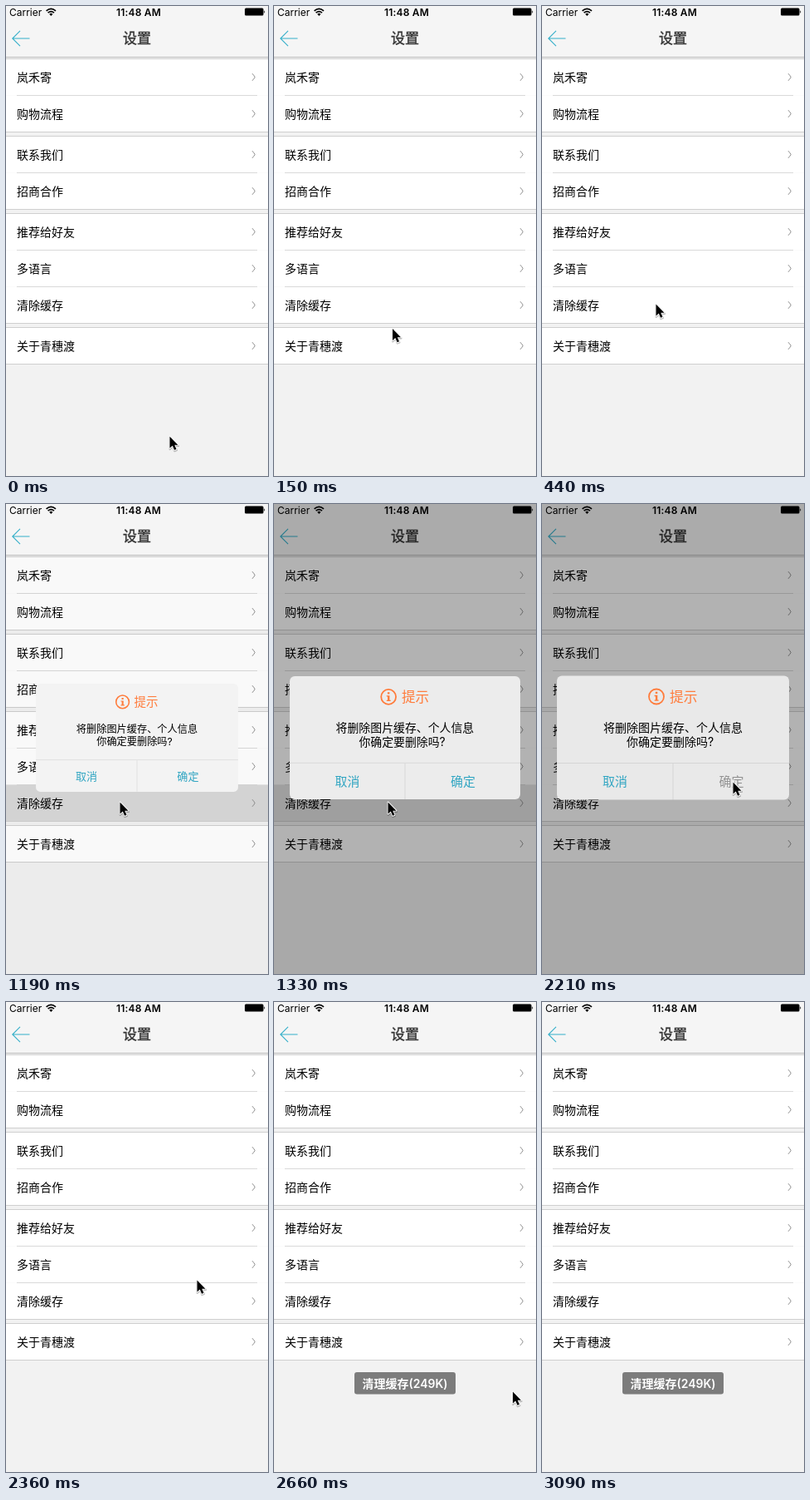
Write an HTML page that moves like this. It is 316 px wide and 565 px high and loops after 3.49 s.

```html
<!DOCTYPE html>
<html lang="zh-CN">
<head>
<meta charset="utf-8">
<title>设置</title>
<style>
  html, body { margin: 0; width: 100%; height: 100%; overflow: hidden; background: #f2f2f2; }
  svg { display: block; width: 316px; height: 565px; }
  text { font-family: Inter, "Noto Sans CJK SC", "Noto Sans CJK", sans-serif; font-size: 14px; }
  .mid { text-anchor: middle; }
  .line { fill: none; stroke: #d9d9d9; }
  .accent { fill: #30a5c2; }
  .warn { fill: #ff7c3c; }
</style>
</head>
<body>
<svg viewBox="0 0 316 565">
  <rect width="316" height="565" fill="#f2f2f2"/>
  <g id="header">
    <rect width="316" height="61" fill="#f5f5f5"/>
    <path d="M0 61.5H316" stroke="#bdbdbd"/>
    <text x="4" y="11.5" style="font-size:12px">Carrier</text>
    <g fill="none" stroke="#000" stroke-width="1.7">
      <path d="M48.6 5.8Q54.3 .8 60 5.8M50.6 8.2Q54.3 5 58 8.2"/>
      <path d="M52.2 9.7Q54.3 8 56.4 9.7L54.3 12Z" fill="#000" stroke="none"/>
    </g>
    <text class="mid" x="160" y="11.5" style="font-size:12px;font-weight:600;letter-spacing:.2px">11:48 AM</text>
    <rect x="288" y="2.5" width="22.5" height="9" rx="1.5"/>
    <path d="M311.3 5.2Q313.2 7 311.3 8.8Z"/>
    <path d="M28.5 39H8M17 29.8L7.8 39L17 48.2" fill="none" stroke="#35afc9" stroke-width="1.1"/>
    <text class="mid" x="158" y="45.3" fill="#333" stroke="#333" stroke-width=".4" style="font-size:17px">设置</text>
  </g>
  <g id="list"></g>
  <rect id="shade" width="316" height="565"/>
  <g id="dialog">
    <rect id="panel" x="18" y="206.5" width="280" height="149" rx="6"/>
    <circle cx="138" cy="231.5" r="9" fill="none" stroke="#ff7c3c" stroke-width="1.8"/>
    <path class="warn" d="M136.8 225.8h2.5v2.3h-2.5zM135.6 229.8h3.7v5.6h1.3v1.4h-5v-1.4h1.3v-4.2h-1.3z"/>
    <text class="warn" x="154" y="237.8" style="font-size:16.7px">提示</text>
    <text x="74" y="273.8">将删除图片缓存、个人信息</text>
    <text x="102" y="290.8">你确定要删除吗?</text>
    <path d="M18 311.5H298M158 311.5V355.5" stroke="#000" opacity=".08"/>
    <text class="mid accent" x="88" y="339.2" style="font-size:15px">取消</text>
    <text id="confirm" class="mid" x="228.5" y="339.2" style="font-size:15px">确定</text>
  </g>
  <g id="toast">
    <rect x="97" y="445" width="122" height="26.5" rx="3" fill="#7c7c7c"/>
    <text class="mid" x="158" y="463.6" fill="#fff" style="font-weight:600">清理缓存(249K)</text>
  </g>
  <g id="cursor" stroke-linejoin="round">
    <path d="M0 0V14L3.3 11L5.6 16.3L8 15.3L5.8 10.2H10Z" stroke="#000" stroke-width="2.4" opacity=".25" transform="translate(.3 1.2)"/>
    <path d="M0 0V14L3.3 11L5.6 16.3L8 15.3L5.8 10.2H10Z" stroke="#fff" stroke-width="1.8" paint-order="stroke"/>
  </g>
</svg>
<script>
const LOOP = 3490;
const ROW = 44;
const $ = id => document.getElementById(id);

const groups = [
  [63.5, ['岚禾寄', '购物流程']],
  [156.5, ['联系我们', '招商合作']],
  [249.5, ['推荐给好友', '多语言', '清除缓存']],
  [386.5, ['关于青穗渡']]
];

$('list').innerHTML = groups.map(([top, labels]) => {
  const height = ROW * labels.length;
  const rows = labels.map((label, i) => {
    const y = top + ROW * i;
    const mid = y + ROW / 2;
    const id = label === '清除缓存' ? 'id="pressed"' : '';
    return `<rect ${id} y="${y}" width="316" height="${ROW}" fill="#fff"/>
      ${i ? `<path class="line" d="M13 ${y}H303"/>` : ''}
      <text x="13" y="${mid + 5.2}">${label}</text>
      <path d="M297 ${mid - 4.3}Q299 ${mid - 2} 300.2 ${mid}Q299 ${mid + 2} 297 ${mid + 4.3}" fill="none" stroke="#8c8c8c"/>`;
  }).join('');
  return rows + `<path class="line" style="stroke:#cfcfcf" d="M0 ${top}H316M0 ${top + height}H316"/>`;
}).join('');

// [start ms, x, y] of the pointer tip
const pointer = [
  [0, 197.5, 517.5], [150, 143, 388], [300, 137.5, 365], [440, 137.5, 358.5],
  [1620, 195, 343.5], [1770, 228, 335], [1920, 230.5, 334.5],
  [2660, 288, 468.5], [2800, 308.5, 544.5], [2950, 308.5, 562.5], [3090, 400, 600]
];

// [start ms, scale, panel colour, shade opacity, shade top, pressed row colour]
const dialog = [
  [0, 0, '#fff', 0, 0, '#fff'],
  [1190, .871, '#f3f3f3', .025, 62, '#d8d8d8'],
  [1330, .993, '#ececec', .3, 0, '#e3e3e3'],
  [1480, 1, '#e9e9e9', .3, 0, '#fff'],
  [2360, 0, '#fff', 0, 0, '#fff']
];

const at = (steps, t) => steps.findLast(step => step[0] <= t);
const show = (id, on) => $(id).setAttribute('visibility', on ? 'visible' : 'hidden');

function draw(now) {
  const t = now % LOOP;
  const [, x, y] = at(pointer, t);
  const [, scale, panel, shade, shadeTop, row] = at(dialog, t);

  $('cursor').setAttribute('transform', `translate(${x} ${y})`);
  show('dialog', scale > 0);
  $('dialog').setAttribute('transform', `translate(158 281) scale(${scale}) translate(-158 -281)`);
  $('panel').setAttribute('fill', panel);
  $('shade').setAttribute('opacity', shade);
  $('shade').setAttribute('y', shadeTop);
  $('pressed').setAttribute('fill', row);
  $('confirm').setAttribute('fill', t >= 2210 ? '#929292' : '#30a5c2');
  show('toast', t >= 2660);
}

const start = performance.now();
function tick() {
  draw(performance.now() - start);
  requestAnimationFrame(tick);
}
tick();
</script>
</body>
</html>
```
